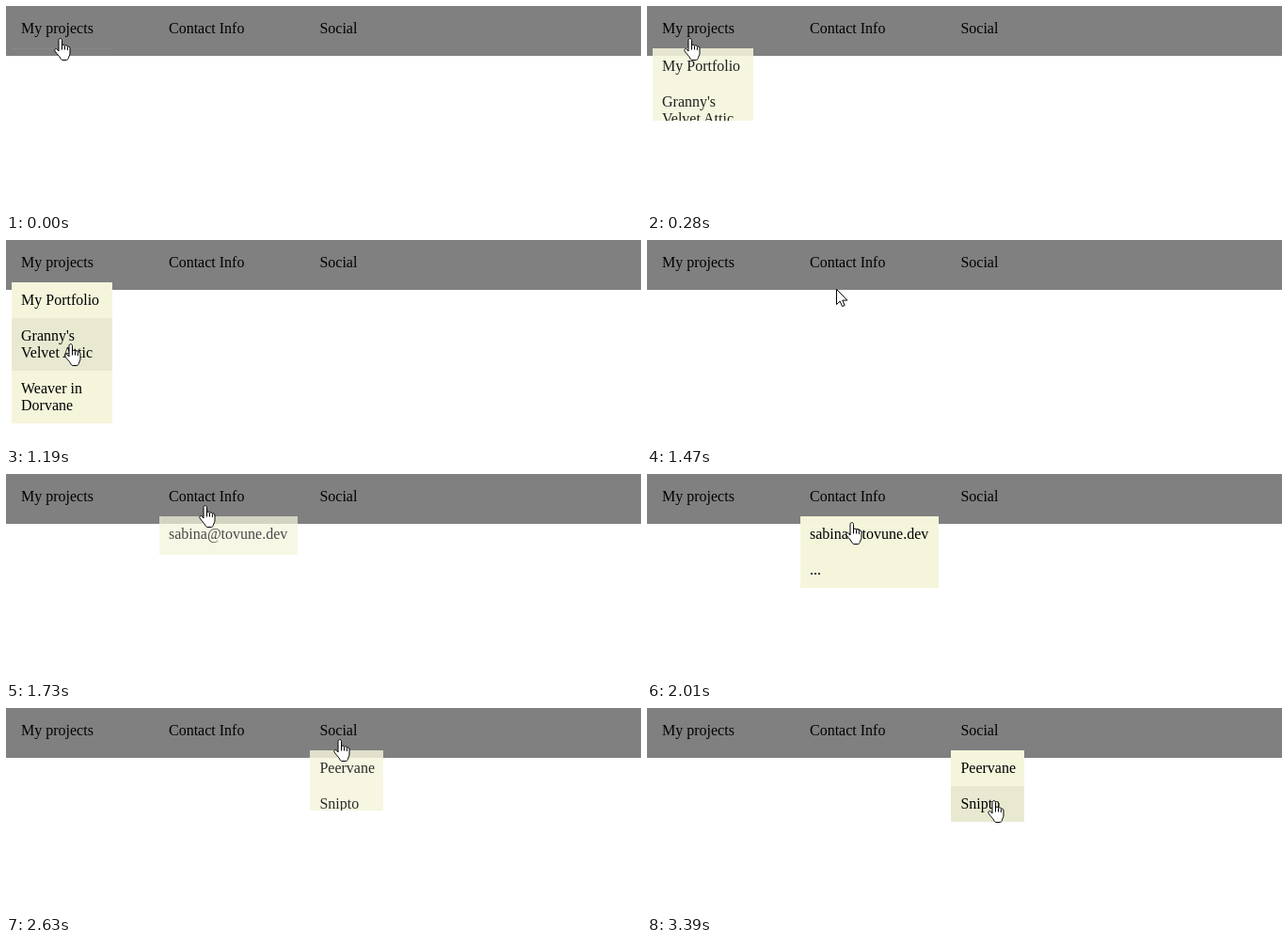
Recreate the animation shown at these times as an HTML page. Size 675 by 219 pixels, loop 4380 ms.

```html
<!DOCTYPE html>
<html lang="en">
<head>
<meta charset="utf-8">
<title>Dropdown menu</title>
<style>
  html, body { margin: 0; width: 100%; height: 100%; overflow: hidden; background: #fff; }
  svg { display: block; width: 675px; height: 219px; }
  text { font: 16px "Liberation Serif", "Times New Roman", serif; fill: #000; white-space: pre; }
</style>
</head>
<body>
<svg viewBox="0 0 675 219">
  <rect width="675" height="53" fill="#808080"/>
  <g id="menu"></g>
  <g id="cursor" stroke="#000" stroke-linejoin="round" fill="#fff">
    <g id="hand">
      <path d="M5 14V2.5C5 0 8.5 0 8.5 2.5V8C9 6.6 11.3 6.8 11.5 8.5C12.2 7.3 14.2 7.7 14.4 9.3C15.3 8.5 17 9.2 17 11V16C17 18.5 15.7 19.5 15.4 21.3C15.1 23 14 23.5 12 23.5H10C8 23.5 7.2 22.8 6.6 21.2C5.8 19.2 3 17 1.2 14.2C0 12.2 2 10.6 3.4 12Z"/>
      <path d="M8.5 8V12.5M11.5 9V12.5M14.4 9.8V13" fill="none"/>
    </g>
    <path id="arrow" d="M.5 .5V16.6L4.2 13.1L6.6 18.6L9.2 17.5L6.8 12.1H11.9Z"/>
  </g>
</svg>
<script>
const LOOP = 4380, TICK = 69.1, LAST = 49;
const TOP = 45, PAD = 10, LINE = 18;
const $ = id => document.getElementById(id);

// open and close are counted in ticks
const menus = [
  { label: "My projects", x: 6, width: 107, open: -.58, close: 19,
    items: ["My Portfolio", "Granny's\nVelvet Attic", "Weaver in\nDorvane"] },
  { label: "Contact Info", x: 163, width: 147, open: 21.7, close: 34,
    items: ["sabina@tovune.dev", "..."] },
  { label: "Social", x: 323.4, width: 78, open: 33.87, close: Infinity,
    items: ["Peervane", "Snipto"] }
];

// Places the pointer passes: tick, x, y
const stops = [
  [0, 51, 34], [4, 39, 34], [8, 39, 34], [10, 48, 66], [15, 51, 114],
  [18, 68, 108], [21, 195, 52], [24, 204, 28], [29, 211, 51], [32, 222, 72],
  [34, 348, 33], [40, 348, 33], [43, 334, 60], [45, 373, 84], [49, 362, 98]
];

function add(parent, tag, attrs, content = "") {
  const el = document.createElementNS("http://www.w3.org/2000/svg", tag);
  for (const key in attrs) el.setAttribute(key, attrs[key]);
  el.textContent = content;
  return parent.appendChild(el);
}

function show(el, visible) {
  el.style.display = visible ? "" : "none";
}

function bezier(x1, y1, x2, y2) {
  const at = (a, b, s) => 3 * a * s * (1 - s) ** 2 + 3 * b * s * s * (1 - s) + s ** 3;
  return x => {
    if (x >= 1) return 1;
    let lo = 0, hi = 1;
    for (let i = 0; i < 24; i++) {
      const mid = (lo + hi) / 2;
      if (at(x1, x2, mid) < x) lo = mid; else hi = mid;
    }
    return at(y1, y2, lo);
  };
}
const ease = bezier(.25, .1, .25, 1);
const easeInOut = bezier(.42, 0, .58, 1);

function build(menu, i) {
  const x = Math.round(menu.x), { width } = menu;
  const textX = menu.x + PAD;
  add($("menu"), "text", { x: textX, y: 29 }, menu.label);
  const clip = add($("menu"), "clipPath", { id: "clip" + i });
  menu.mask = add(clip, "rect", { x, y: TOP, width });
  menu.panel = add($("menu"), "g", { "clip-path": `url(#clip${i})` });
  let y = TOP;
  menu.rows = menu.items.map(item => {
    const lines = item.split("\n");
    const height = 2 * PAD + LINE * lines.length;
    const row = { top: y, bottom: y + height };
    row.back = add(menu.panel, "rect", { x, y, width, height });
    lines.forEach((line, n) =>
      add(menu.panel, "text", { x: textX, y: y + PAD + 14 + LINE * n }, line));
    y += height;
    return row;
  });
  menu.height = y - TOP;
}
menus.forEach(build);

function pointerAt(tick) {
  const i = Math.max(1, stops.findIndex(stop => stop[0] >= tick));
  const [from, to] = [stops[i - 1], stops[i]];
  const k = (tick - from[0]) / (to[0] - from[0]);
  return [1, 2].map(n => Math.round(from[n] + (to[n] - from[n]) * k));
}

function drawPanel(menu, tick, hotY) {
  const age = (tick - menu.open) * TICK;
  const height = Math.round(185 * easeInOut(age / 700));
  menu.panel.setAttribute("opacity", ease(age / 540));
  menu.mask.setAttribute("height", Math.min(menu.height, height));
  for (const { back, top, bottom } of menu.rows)
    back.setAttribute("fill", hotY >= top && hotY < bottom ? "#e9e9d1" : "#f5f5dc");
}

function draw(time) {
  const tick = Math.min(LAST, Math.floor(time / TICK));
  const [x, y] = pointerAt(tick);
  const active = menus.find(menu => tick >= menu.open && tick < menu.close);
  for (const menu of menus) show(menu.panel, menu === active);
  if (active) drawPanel(active, tick, y - 7);
  show($("hand"), active);
  show($("arrow"), !active);
  $("cursor").setAttribute("transform", `translate(${active ? x : x + 6} ${y})`);
}

const began = performance.now();
function frame() {
  draw((performance.now() - began) % LOOP);
  requestAnimationFrame(frame);
}
frame();
</script>
</body>
</html>
```
